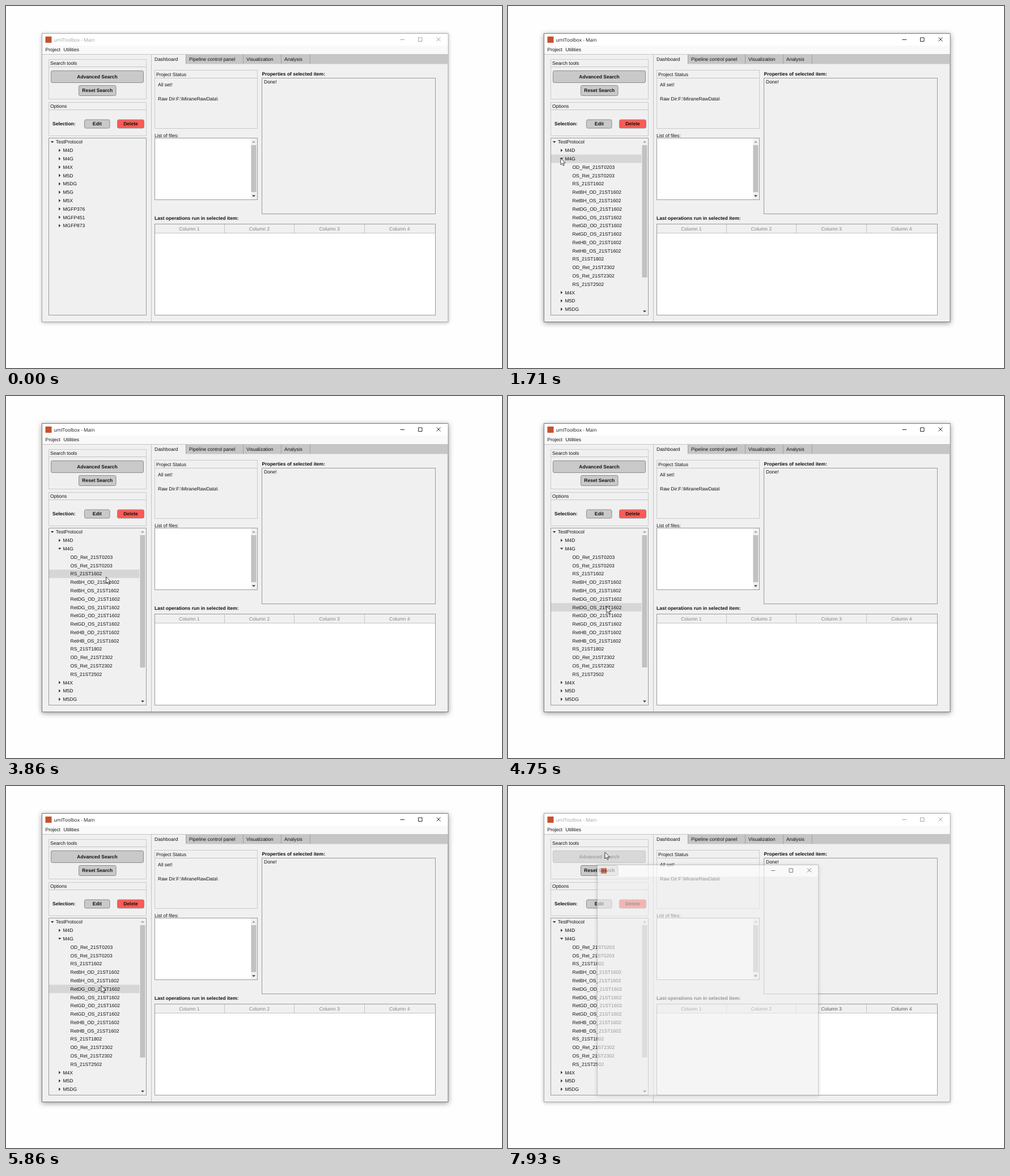
An HTML page for the animation above (8000 ms loop, 875 by 640 pixels).

```html
<!DOCTYPE html>
<html lang="en">
<head>
<meta charset="utf-8">
<title>Toolbox window</title>
<style>
html, body { margin: 0; width: 100%; height: 100%; overflow: hidden; background: #fefefe; }
svg { display: block; width: 875px; height: 640px; }
text { font: 8.5px "Liberation Sans", Arial, sans-serif; fill: #111; text-rendering: geometricPrecision; white-space: pre; }
.b { font-weight: bold; }
.mid { text-anchor: middle; }
.title { font: 8.3px "Open Sans", sans-serif; fill: #93a3a0; }
.active .title { fill: #111; }
.frame { fill: #f0f0f0; stroke: #a8a8a8; filter: drop-shadow(0 1px 3px rgba(0,0,0,.28)); }
.active .frame { stroke: #777; filter: drop-shadow(0 2px 5px rgba(0,0,0,.4)); }
.ctl { fill: none; stroke: #999; stroke-width: .9; }
.active .ctl, #popup .ctl { stroke: #111; }
.panel { fill: none; stroke: #cacaca; }
.box { fill: #f0f0f0; stroke: #9a9a9a; }
.white { fill: #fff; }
.line { fill: none; stroke: #c4c4c4; }
.btn rect { fill: #c9c9c9; stroke: #8c8c8c; }
.btn.red rect { fill: #ff5a55; }
.btn.hover rect { fill: #e1dfe0; }
.btn.press rect { fill: #d2d0d1; }
.btn.off rect { fill: #d8d8d8; stroke: #c6c6c6; }
.btn.off text { fill: #a2a2a2; }
.head { fill: #828282; }
.dim .head { fill: #555; }
.thumb { fill: #c1c1c1; }
.tri { fill: #33202f; }
.faint { fill: #9a9a9a; }
.dark { fill: #333; }
#hover { fill: #d6d6d6; }
#popup { transform-origin: 352px 343px; }
</style>
</head>
<body>
<svg viewBox="0 0 875 640">
  <g id="win"></g>
  <g id="popup"></g>
  <path id="cursor" d="M0 0V11.6L2.7 9.2 4.4 13.2 6.2 12.4 4.5 8.5H8.2Z" fill="#fff" stroke="#111" stroke-width=".8"/>
</svg>
<script>
const LOOP = 8000, ROW = 14.78, TOP = 233.1;
const $ = id => document.getElementById(id);

const text = (x, y, s, cls = '') => `<text x="${x}" y="${y + 3}" class="${cls}">${s}</text>`;
const rect = (x, y, r, b, cls) => `<rect x="${x}" y="${y}" width="${r - x}" height="${b - y}" class="${cls}"/>`;
const path = (d, cls) => `<path d="${d}" class="${cls}"/>`;
const panel = (y, b, r, x, line, name) =>
  rect(x, y, r, b, 'panel') + path(`M${x} ${line}H${r}`, 'line') + text(x + 2.5, line - 7, name);
const button = (id, x, y, r, b, s, cls = '') =>
  `<g id="${id}" class="btn ${cls}"><rect x="${x}" y="${y}" width="${r - x}" height="${b - y}" rx="2.5"/>` +
  text((x + r) / 2, (y + b) / 2 - .4, s, 'b mid') + '</g>';
const controls = (x, y) => path(
  `M${x - 4} ${y + .5}h7.5M${x + 28} ${y - 3}h6.5v6.5h-6.5zM${x + 60} ${y - 3.5}l7 7m0 -7l-7 7`, 'ctl');
const scroll = (x, top, end, bottom) =>
  rect(x - 5, top - 6, x + 6, bottom + 6, 'bar') + rect(x - 4.5, top + 6, x + 4.5, end, 'thumb') +
  path(`M${x - 3} ${top + 1.5}h6l-3 -3z`, 'faint') + path(`M${x - 3} ${bottom - 1.5}h6l-3 3z`, 'dark');

const parents = ['M4D', 'M4G', 'M4X', 'M5D', 'M5DG', 'M5G', 'M5X', 'MGFP376', 'MGFP451', 'MGFP873'];
const batch = ['BH', 'DG', 'GD', 'HB'].flatMap(k => ['OD', 'OS'].map(s => `Ret${k}_${s}_21ST1602`));
const children = ['OD_Ret_21ST0203', 'OS_Ret_21ST0203', 'RS_21ST1602', ...batch,
  'RS_21ST1802', 'OD_Ret_21ST2302', 'OS_Ret_21ST2302', 'RS_21ST2502'];

const node = (s, i, level, open) => {
  const y = TOP + (i + .5) * ROW, x = level ? 92 : 79;
  const mark = level > 1 ? '' : path(open ? `M${x} ${y - 1.5}h5.4l-2.7 3z` : `M${x + 1.2} ${y - 2.8}v5.6l3 -2.8z`, 'tri');
  return mark + text([88, 100.5, 113.5][level], y, s);
};
const closedTree = parents.map((s, i) => node(s, i + 1, 1)).join('');
const openTree = node('M4D', 1, 1) + node('M4G', 2, 1, true) +
  children.map((s, i) => node(s, i + 3, 2)).join('') +
  parents.slice(2, 5).map((s, i) => node(s, i + 18, 1)).join('') + scroll(241, 240, 480, 540);

const tabs = [['Dashboard', 262], ['Pipeline control panel', 323], ['Visualization', 424], ['Analysis', 491]];

$('win').innerHTML =
  rect(63.5, 48.5, 780, 558.5, 'frame') +
  '<path fill="#fff" d="M64 49H779.5V70H64z"/><path fill="#f9f9f9" d="M64 70H779.5V85H64z"/>' +
  '<rect x="69.5" y="54" width="11" height="11" fill="#c8502d"/>' +
  text(84.5, 59.5, 'umIToolbox - Main', 'title') + controls(699.5, 59) +
  text(69.5, 77, 'Project') + text(101.5, 77, 'Utilities') +
  '<path fill="#c6c6c6" d="M317 86H779.5V102.5H317z"/>' +
  path('M64 85.5H779.5M256.5 86V558', 'line') +
  '<path stroke="#a0a0a0" d="M317.5 86V102M418.5 86V102M485.5 86V102M536.5 86V102"/>' +
  tabs.map(([s, x]) => text(x, 94, s)).join('') +
  panel(94.5, 164.5, 247.5, 75.5, 107.5, 'Search tools') +
  button('adv', 79.5, 114.5, 242.5, 135.5, 'Advanced Search') +
  button('reset', 128.5, 140.5, 194, 158.5, 'Reset Search') +
  panel(170.5, 229.5, 247.5, 75.5, 183.5, 'Options') +
  text(82, 208, 'Selection:', 'b') +
  button('edit', 138.5, 201, 183, 216, 'Edit') +
  button('del', 196.5, 201, 243.5, 216, 'Delete', 'red') +
  rect(75.5, 233.5, 247.5, 546.5, 'box') +
  '<rect id="hover" x="76" height="14.8"/>' + node('TestProtocol', 0, 0, true) +
  `<g id="closed">${closedTree}</g><g id="open">${openTree}</g>` +
  panel(113.5, 216.5, 443.5, 262.5, 127.5, 'Project Status') +
  text(268, 139.3, 'All set!') + text(268, 163.8, 'Raw Dir:F:\\MiraneRawData\\') +
  text(262, 229, 'List of files:') + rect(262.5, 233.5, 443.5, 342.5, 'box white') +
  '<path fill="#f0f0f0" d="M432 234H443V342H432z"/>' + scroll(437, 240, 329, 336) +
  text(451.5, 119.5, 'Properties of selected item:', 'b') +
  rect(451.5, 127.5, 757.5, 367.5, 'box') + text(455, 134.2, 'Done!') +
  text(262, 375.3, 'Last operations run in selected item:', 'b') +
  rect(262.5, 385.5, 757.5, 546.5, 'box white') +
  '<path fill="#f0f0f0" d="M263 386H757V401H263z"/>' +
  path('M263 401.5H757M385.5 386V401M508.5 386V401M632.5 386V401', 'line') +
  [1, 2, 3, 4].map(n => text(199.8 + 123.6 * n, 393.5, 'Column ' + n, 'head mid')).join('');
document.querySelectorAll('.bar').forEach(e => e.setAttribute('fill', '#f0f0f0'));

$('popup').innerHTML = rect(157.5, 139.5, 547.5, 546.5, 'frame') +
  '<path fill="#fff" d="M158 140H547V160H158z"/>' +
  '<rect x="164" y="145" width="10" height="10" fill="#c8502d"/>' + controls(468, 149);

// Cursor moves: start, end, number of steps, [step, x, y] stops
const moves = [
  [320, 1090, 12, [[1, 480, 616], [5, 250, 405], [9, 135, 300], [12, 111, 277.6]]],
  [1160, 1710, 8, [[1, 105, 274], [4, 93, 269], [8, 93, 269]]],
  [2450, 2920, 7, [[0, 93, 269], [2, 112, 274], [5, 166, 286], [7, 175, 289]]],
  [3060, 3180, 3, [[0, 175, 289], [3, 178, 289]]],
  [3380, 3381, 1, [[1, 179, 289]]],
  [3580, 3930, 6, [[0, 179, 289], [6, 176, 326]]],
  [4330, 5100, 12, [[0, 176, 326], [7, 174, 372], [12, 174, 418]]],
  [5170, 5940, 11, [[0, 174, 418], [4, 173, 524], [6, 171, 500], [10, 168, 353], [11, 168, 347]]],
  [6020, 6150, 3, [[0, 168, 347], [3, 168, 331]]],
  [6550, 7320, 12, [[0, 168, 331], [2, 168, 305], [8, 171, 132], [12, 171, 117]]]
];

function cursorAt(t) {
  const m = moves.filter(s => s[0] <= t).pop();
  if (!m) return null;
  const [from, to, n, stops] = m;
  const k = Math.min(n, Math.floor((t - from) / (to - from) * (n - 1) + .15) + 1);
  const j = Math.max(1, stops.findIndex(s => s[0] >= k));
  const b = stops[j] || stops[0], a = stops[j - 1];
  const p = b[0] === a[0] ? 1 : (k - a[0]) / (b[0] - a[0]);
  return [a[1] + (b[1] - a[1]) * p, a[2] + (b[2] - a[2]) * p];
}

const inside = (c, x, y, r, b) => !!c && c[0] > x && c[0] < r && c[1] > y && c[1] < b;
const show = (id, on) => { $(id).style.display = on ? '' : 'none'; };

function draw(t) {
  const c = cursorAt(t), open = t >= 1640, off = t >= 7860;
  const right = open ? 235.5 : 247;
  show('cursor', c);
  if (c) $('cursor').setAttribute('transform', `translate(${c})`);
  show('open', open);
  show('closed', !open);

  const row = c ? Math.floor((c[1] - TOP) / ROW) : -1;
  show('hover', inside(c, 76, TOP, right, 546) && row <= (open ? 20 : 10));
  $('hover').setAttribute('y', TOP + row * ROW);
  $('hover').setAttribute('width', right - 76);

  $('adv').classList.toggle('hover', inside(c, 79, 114, 243, 136));
  $('adv').classList.toggle('press', t >= 7460 && t < 7590);
  $('adv').classList.toggle('off', off);
  $('reset').classList.toggle('hover', inside(c, 128, 140, 194, 159));
  $('edit').classList.toggle('hover', inside(c, 138, 201, 183, 216));

  $('win').classList.toggle('active', t >= 1440 && t < 7590);
  $('win').classList.toggle('dim', t >= 7590);
  show('popup', off);
  $('popup').style.opacity = t < 7930 ? .25 : .6;
  $('popup').style.transform = t < 7930 ? 'scale(.97)' : 'none';
}

const start = performance.now();
function tick() {
  draw((performance.now() - start) % LOOP);
  requestAnimationFrame(tick);
}
tick();
</script>
</body>
</html>
```
